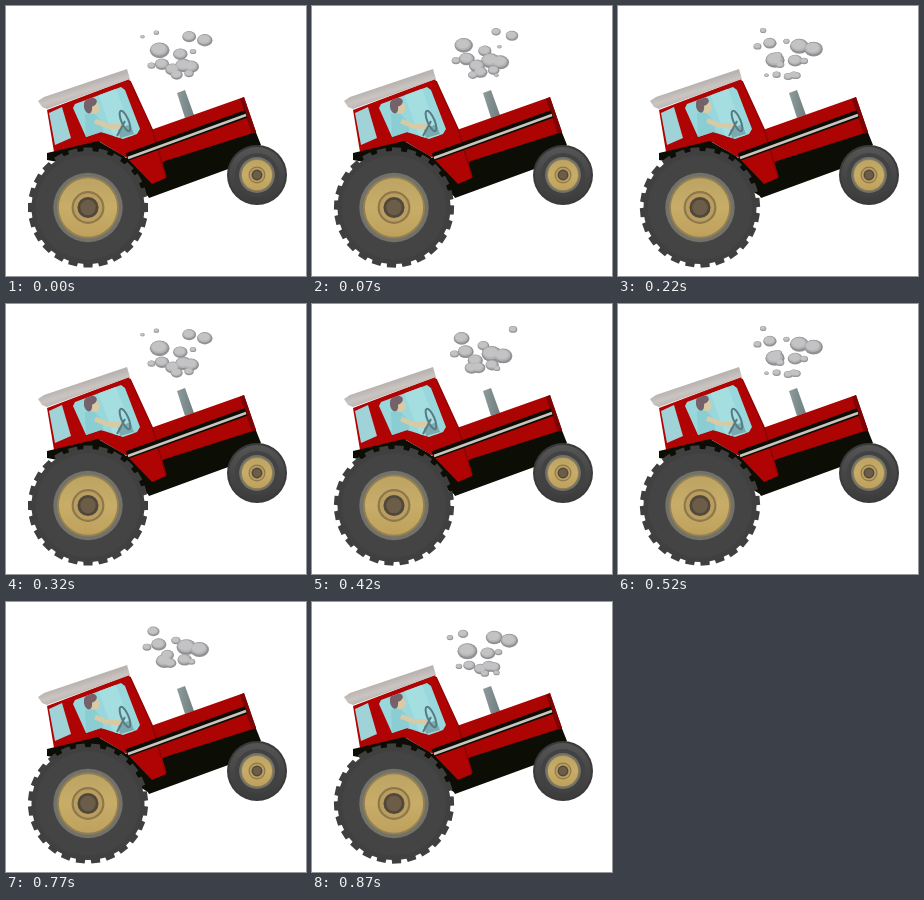
Recreate the animation shown at these times as an HTML page with a canvas. Size 300x270 px, loop 920 ms.

```html
<!DOCTYPE html>
<html lang="en">
<head>
<meta charset="utf-8">
<title>Tractor</title>
<style>
html, body { margin: 0; width: 100%; height: 100%; overflow: hidden; background: #fff; }
canvas { display: block; width: 300px; height: 270px; }
</style>
</head>
<body>
<canvas id="stage" width="300" height="270"></canvas>
<script>
const ctx = document.getElementById('stage').getContext('2d');
const LOOP = 920, CYCLE = 6, LUGS = 24, TAU = Math.PI * 2;
const RED = '#b00404', BLACK = '#0c0d05', SKIN = '#d8caa4', GLASS = '#98d8dc';

// Each puff drifts from the exhaust to its end point; born and life count steps.
const puffs = [
  { born: 3, life: 12, from: 175, to: [202, 21], bend: 5, size: 9.5 },
  { born: 3, life: 11, from: 175, to: [185, 21], bend: 0, size: 10 },
  { born: 3, life: 9.5, from: 160, to: [150, 24], bend: -1, size: 8 },
  { born: 0, life: 10.5, from: 162, to: [144, 22], bend: 2, size: 10 },
  { born: 3, life: 10, from: 150, to: [135, 26], bend: 0, size: 4.5 },
  { born: -2, life: 13, from: 186, to: [167, 32], bend: 0, size: 7.5 },
  { born: 0, life: 8, from: 184, to: [188, 36], bend: 0, size: 4 },
  { born: 3, life: 8, from: 172, to: [158, 46], bend: 0, size: 8 },
  { born: 4, life: 7, from: 175, to: [160, 56], bend: 0, size: 7 }
];

function trace(points) {
  ctx.beginPath();
  points.forEach(([x, y]) => ctx.lineTo(x, y));
}

function poly(fill, ...points) {
  trace(points);
  ctx.fillStyle = fill;
  ctx.fill();
}

function line(color, width, ...points) {
  trace(points);
  ctx.strokeStyle = color;
  ctx.lineWidth = width;
  ctx.stroke();
}

function oval(fill, x, y, rx, ry = rx, tilt = 0) {
  ctx.beginPath();
  ctx.ellipse(x, y, rx, ry, tilt, 0, TAU);
  ctx.fillStyle = fill;
  ctx.fill();
}

function shade(x0, y0, x1, y1, ...colors) {
  const g = ctx.createLinearGradient(x0, y0, x1, y1);
  colors.forEach((c, i) => g.addColorStop(i / (colors.length - 1), c));
  return g;
}

function livePuffs(phase) {
  const live = [];
  for (const { born, life, from, to, bend, size } of puffs) {
    for (let age = (phase - born + CYCLE) % CYCLE; age < life; age += CYCLE) {
      const u = age / life, arc = Math.sin(Math.PI * u);
      live.push({
        x: from + (to[0] - from) * u + bend * arc,
        y: 74 + (to[1] - 74) * u,
        r: size * arc ** 0.6
      });
    }
  }
  return live;
}

// Shadows go down first so that neighbouring puffs merge into one cloud.
function drawSmoke(phase) {
  const live = livePuffs(phase);
  live.forEach(({ x, y, r }) => oval('#929296', x, y, r, r * 0.8));
  live.forEach(({ x, y, r }) => oval('#b4b4b6', x - r * 0.06, y - r * 0.1, r * 0.86, r * 0.64));
  live.forEach(({ x, y, r }) => oval('#c3c3c4', x - r * 0.1, y - r * 0.16, r * 0.7, r * 0.5));
}

function drawDriver(phase) {
  ctx.save();
  ctx.translate(0, phase > 3 ? -0.7 : 0);
  poly('#8acdd3', [79, 108], [88, 107], [96, 116], [98, 130], [80, 132]);
  oval(SKIN, 88.5, 102, 5, 6);
  oval('#75616a', 84.5, 96.5, 6.5, 4.5, -0.3);
  oval('#75616a', 82, 101, 4, 6.5, -0.2);
  line(SKIN, 5, [89, 115], [101, 120], [117, 121]);
  ctx.restore();
  poly('#78aab0', [112, 124], [124, 118], [128, 128], [114, 132]);
  ctx.beginPath();
  ctx.ellipse(119, 115, 3.5, 11, -0.4, 0, TAU);
  ctx.strokeStyle = '#587b83';
  ctx.lineWidth = 2;
  ctx.stroke();
  line('#587b83', 2, [119, 115], [111, 130]);
}

function drawCab(phase) {
  poly(RED, [41, 104], [123, 73], [146, 123], [160, 172], [146, 178],
    [121, 152], [94, 136], [48, 146]);
  line('#8d0505', 1.5, [124, 75], [146, 123], [160, 171]);
  poly('#9fd3d8', [43, 107], [56, 101], [65, 132], [49, 139]);

  ctx.save();
  ctx.lineJoin = 'round';
  const glass = [[69, 98], [115, 81], [119, 84], [134, 123], [131, 128],
    [117, 133], [95, 126], [80, 131], [67, 102]];
  poly(GLASS, ...glass);
  ctx.clip();
  poly('#a4dee1', [92, 88], [109, 80], [127, 130], [108, 132]);
  drawDriver(phase);
  ctx.restore();
}

function drawBody(phase) {
  poly(shade(171, 98, 188, 98, '#8f9b9c', '#6f7e7e'), [171, 87], [179, 84], [188, 109], [179, 112]);

  // Chassis and bonnet
  poly(BLACK, [119, 152], [158, 150], [249, 124], [255, 139], [225, 162], [143, 192]);
  poly('#ac0303', [142, 125], [238, 91], [250, 126], [159, 155], [140, 165]);
  poly('#7d0404', [234, 93], [238, 91], [250, 126], [246, 128]);

  drawCab(phase);
  line(BLACK, 8, [121, 151], [240, 108]);
  line('#c9c5bd', 2.4, [122, 152], [240, 109]);

  // Wheel arch
  poly(BLACK, [41, 147], [92, 135], [118, 150], [137, 170], [142, 190], [100, 165], [41, 154]);

  poly(shade(76, 79, 80, 92, '#b9b3b1', '#cbc5c2', '#bbb4b2'),
    [32, 95], [38, 91], [121, 63], [124, 73], [41, 103], [36, 101]);
}

function drawRim(x, y, r) {
  oval('#72726b', x, y, r * 1.12);
  oval('#95804f', x, y, r);
  oval(shade(x, y - r, x, y + r, '#bca363', '#c7ad68', '#bda05b'), x, y, r * 0.94);
  oval('#8e774a', x, y, r * 0.53);
  oval('#b99e60', x, y, r * 0.46);
  oval('#51473a', x, y, r * 0.34);
  oval('#6c5d48', x, y, r * 0.25);
}

function drawRearWheel(x, y, turn) {
  ctx.save();
  ctx.translate(x, y);
  ctx.rotate(turn);
  for (let i = 0; i < LUGS; i++) {
    ctx.rotate(TAU / LUGS);
    poly('#3f3f3f', [50, -5], [60, -4.5], [60, 4.5], [50, 5]);
  }
  ctx.restore();
  oval('#404040', x, y, 56.5);
  oval('#444', x, y, 52);
  drawRim(x, y, 31);
}

function drawFrontWheel(x, y) {
  oval('#3a3a3a', x, y, 30);
  oval(shade(x, y - 28, x, y + 28, '#555', '#464646', '#3c3c3c'), x, y, 28);
  oval('#424242', x, y, 22);
  drawRim(x, y, 16);
}

function draw(time) {
  const step = time < 70 ? 0 : Math.floor((time - 20) / 50);
  const phase = step % CYCLE;
  ctx.fillStyle = '#fff';
  ctx.fillRect(0, 0, 300, 270);
  drawSmoke(phase);
  drawBody(phase);
  drawFrontWheel(251, 169);
  drawRearWheel(82, 201.5, phase / CYCLE * TAU / LUGS);
}

const start = performance.now();
function tick() {
  draw((performance.now() - start) % LOOP);
  requestAnimationFrame(tick);
}
tick();
</script>
</body>
</html>
```
